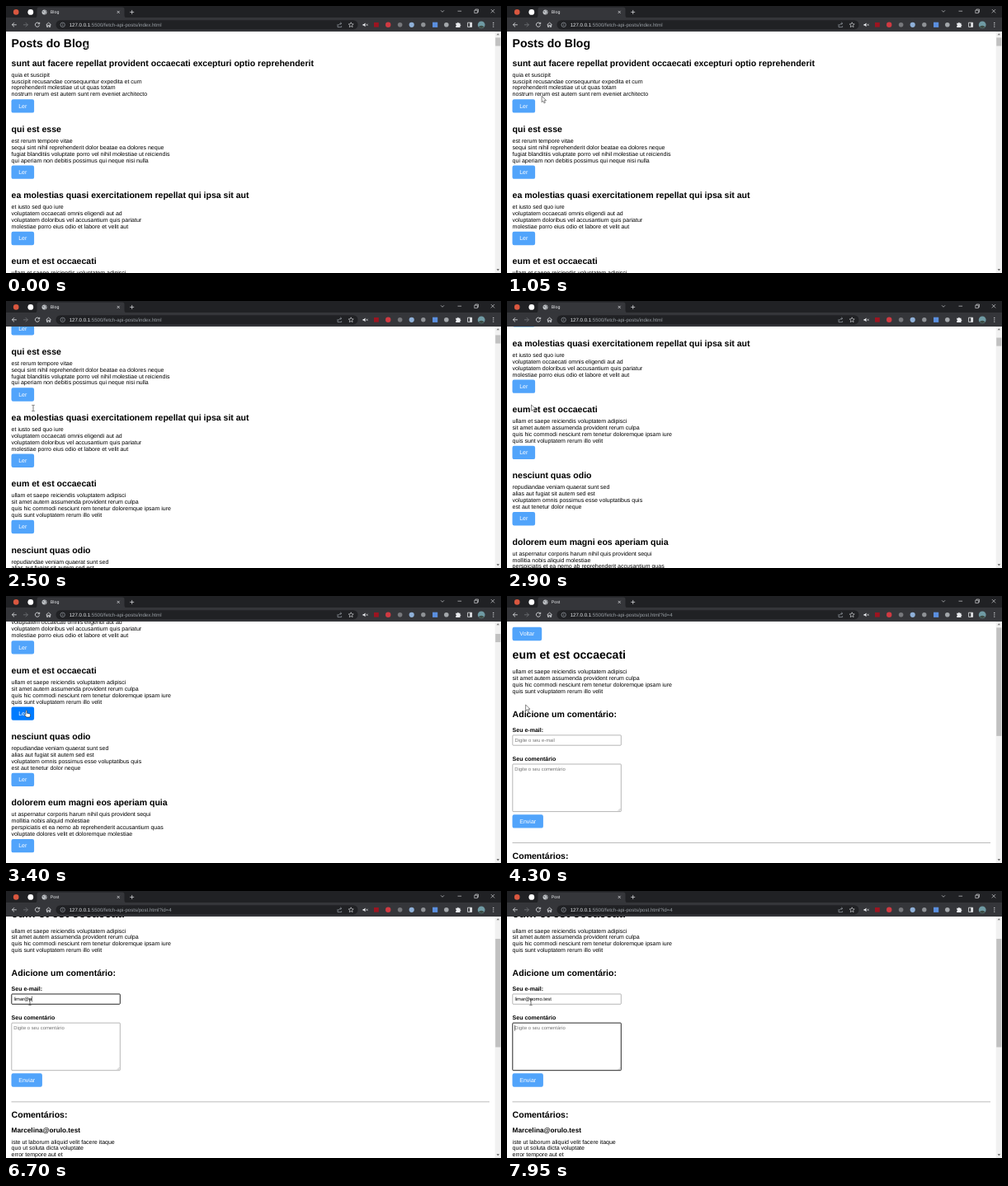
These frames come from a looping animation (600 by 324 pixels, 8000 ms). An HTML page:

```html
<!DOCTYPE html>
<html lang="pt">
<head>
<meta charset="utf-8">
<title>Blog</title>
<style>
  html, body { margin: 0; height: 100%; overflow: hidden; background: #fff; }
  svg { display: block; width: 100vw; height: 100vh; }
  text { font-family: "Liberation Sans", Arial, sans-serif; text-rendering: geometricPrecision; }
</style>
</head>
<body>
<svg id="stage" viewBox="0 0 600 324"></svg>
<script>
const LOOP = 8000, NAV = 4150, FOCUS = 5300, LEAVE = 7950;
const TOP = 69, PITCH = 80.27, LINE = 7.906;
const BLUE = '#51a4fb', HOVER = '#007bff';

const posts = [
  ['sunt aut facere repellat provident occaecati excepturi optio reprehenderit',
    'quia et suscipit', 'suscipit recusandae consequuntur expedita et cum',
    'reprehenderit molestiae ut ut quas totam', 'nostrum rerum est autem sunt rem eveniet architecto'],
  ['qui est esse',
    'est rerum tempore vitae', 'sequi sint nihil reprehenderit dolor beatae ea dolores neque',
    'fugiat blanditiis voluptate porro vel nihil molestiae ut reiciendis', 'qui aperiam non debitis possimus qui neque nisi nulla'],
  ['ea molestias quasi exercitationem repellat qui ipsa sit aut',
    'et iusto sed quo iure', 'voluptatem occaecati omnis eligendi aut ad',
    'voluptatem doloribus vel accusantium quis pariatur', 'molestiae porro eius odio et labore et velit aut'],
  ['eum et est occaecati',
    'ullam et saepe reiciendis voluptatem adipisci', 'sit amet autem assumenda provident rerum culpa',
    'quis hic commodi nesciunt rem tenetur doloremque ipsam iure', 'quis sunt voluptatem rerum illo velit'],
  ['nesciunt quas odio',
    'repudiandae veniam quaerat sunt sed', 'alias aut fugiat sit autem sed est',
    'voluptatem omnis possimus esse voluptatibus quis', 'est aut tenetur dolor neque'],
  ['dolorem eum magni eos aperiam quia',
    'ut aspernatur corporis harum nihil quis provident sequi', 'mollitia nobis aliquid molestiae',
    'perspiciatis et ea nemo ab reprehenderit accusantium quas', 'voluptate dolores velit et doloremque molestiae']
];

// Text placed by the middle of its line box
const text = (x, mid, size, str, attrs = '') =>
  `<text x="${x}" y="${(mid + size * 0.346).toFixed(2)}" font-size="${size}" ${attrs}>${str}</text>`;
const bold = (mid, size, str) => text(6.6, mid, size, str, 'font-weight="700"');
const lines = (mid, list) => list.map((s, i) => text(6.6, mid + i * LINE, 7.03, s)).join('');
const rect = (x, y, w, h, fill, attrs = '') =>
  `<rect x="${x}" y="${y}" width="${w}" height="${h}" fill="${fill}" ${attrs}/>`;
const dot = (x, y, r, fill) => `<circle cx="${x}" cy="${y}" r="${r}" fill="${fill}"/>`;
const path = (d, stroke, width = 0.8, fill = 'none') =>
  `<path d="${d}" stroke="${stroke}" stroke-width="${width}" fill="${fill}"/>`;
const button = (y, w, label, cls = '') =>
  rect(6.5, y, w, 16.4, BLUE, `rx="2.2" class="${cls}"`) +
  text(6.5 + w / 2, y + 8.1, 7.03, label, 'fill="#fff" text-anchor="middle"');
const field = (id, y, h) => rect(6.8, y, 131.5, h, '#fff', `id="${id}" rx="0.8"`);

const indexPage = () => bold(45.4, 14.05, 'Posts do Blog') + posts.map(([title, ...body], i) => {
  const y = TOP + i * PITCH;
  return bold(y, 10.54, title) + lines(y + 14.2, body) + button(y + 44.2, 27.6, 'Ler', 'ler');
}).join('');

const postPage = () =>
  button(37.8, 35.7, 'Voltar') + bold(71.3, 14.05, posts[3][0]) + lines(92, posts[3].slice(1)) +
  bold(143.2, 10.54, 'Adicione um comentário:') +
  bold(162.1, 7.03, 'Seu e-mail:') + field('mail', 168.9, 12.3) +
  text(9.4, 175, 5.86, '', 'id="mailText"') +
  bold(197.3, 7.03, 'Seu comentário') + field('note', 204, 57.6) +
  text(9.2, 209.9, 5.86, 'Digite o seu comentário', 'fill="#757575"') +
  path('M134.8 260.7l2.6-2.6M136.4 260.7l1-1', '#666', 0.4) +
  rect(9.4, 0, 0.5, 7, '#000', 'id="caret"') +
  button(265.2, 37.4, 'Enviar') + rect(6.5, 299.3, 579.5, 0.8, '#a5a5a5') +
  bold(315.1, 10.54, 'Comentários:') + bold(334.5, 8.22, 'Marcelina@orulo.test') +
  lines(348, ['iste ut laborum aliquid velit facere itaque', 'quo ut soluta dicta voluptate', 'error tempore aut et']);

const scrollbar = () =>
  rect(592.7, 30.5, 7.3, 293.5, '#f1f1f1') + rect(593.2, 38.4, 6.2, 10, '#c1c1c1', 'id="thumb"') +
  path('M594.6 35.2h3.4l-1.7-1.9z', 'none', 0, '#777') + path('M594.6 319.3h3.4l-1.7 1.9z', 'none', 0, '#505050');

const browser = () => {
  const pale = '#e8eaed', grey = '#9aa0a6';
  return rect(0, 0, 600, 16, '#202124') + rect(0, 14, 600, 17, '#35363a') +
    path('M35 14.5Q37.5 14 37.5 11V4Q37.5 1.5 40 1.5H141Q143.5 1.5 143.5 4V11Q143.5 14 146 14.5z', 'none', 0, '#35363a') +
    dot(12.2, 7.4, 3.3, '#d9573f') + dot(29.8, 7.4, 3.4, '#fff') +
    dot(46.5, 7.4, 3, '#c4c7cb') + path('M44 6l2 .8-.6 1.6M47 4.8l1 1.6 1.4.4M47.4 10l.4-1.8 1-.3', '#5f6368', 0.7) +
    text(53.8, 7.4, 5.27, '', `id="tab" fill="${pale}"`) +
    path('M134.7 5.9l3 3m0-3l-3 3M150.2 7.4h5m-2.5-2.5v5', pale, 0.7) +
    path('M527 5.3l2 2 2-2M547.5 6.2h4.6M587.8 4l4.4 4.4m0-4.4l-4.4 4.4M567.8 5.2h3.6v3.4h-3.6zM568.9 5v-1h3.6v3.4h-1', pale, 0.6) +
    path('M12.8 22.8H7.4m2.6-2.6l-2.6 2.6 2.6 2.6', pale) +
    path('M21 22.8h5.4m-2.6-2.6l2.6 2.6-2.6 2.6', '#75787c') +
    path('M40 21a2.6 2.6 0 1 0 .5 2.4M40.7 19.8v2h-2', pale) +
    path('M48.6 22.8l3-2.6 3 2.6M49.6 22.4v3h1.2v-2h1.6v2h1.2v-3', pale) +
    rect(60.5, 17.2, 366, 11.2, '#202124', 'rx="5.6"') +
    path('M66 22.8a2.7 2.7 0 1 0 5.4 0a2.7 2.7 0 1 0-5.4 0M68.7 22.4v1.8M68.7 21v.7', grey, 0.7) +
    `<text x="76.7" y="24.9" font-size="6.1" fill="${grey}"><tspan fill="${pale}">127.0.0.1</tspan>:5500/fetch-api-posts/<tspan id="file"></tspan></text>` +
    path('M402 22v3.6h4.6v-1.4M403 23.6q.6-2.4 3.4-2.4m-1.2-1.4l1.6 1.4-1.6 1.4', grey, 0.7) +
    path('M418.2 19.8l.9 2 2.1.2-1.6 1.5.5 2.1-1.9-1.1-1.9 1.1.5-2.1-1.6-1.5 2.1-.2z', pale, 0.6) +
    path('M432.5 22h1.3l1.7-1.5v4.8l-1.7-1.5h-1.3z', 'none', 0, pale) + path('M436.6 21.7l2 2.2m0-2.2l-2 2.2', pale, 0.6) +
    rect(446, 20, 5.8, 5.6, '#9c1420') + dot(463.2, 22.8, 3.2, '#d03a42') +
    dot(477.6, 22.8, 2.8, '#77787c') + dot(491.7, 22.8, 3.1, '#8fb0d8') + dot(505.8, 22.8, 2.7, '#8f9296') +
    rect(517, 19.7, 6.2, 6.2, '#5b8fdf') + dot(533.8, 22.8, 2.8, '#a3a7ab') +
    path('M545.2 20.8h1.8q.9-2 1.8 0h1.7v1.8q2 .8 0 1.7v1.6h-5.3v-1.6q1.8-.9 0-1.7z', 'none', 0, pale) +
    path('M559.6 20.2h5v5.2h-5z', pale, 0.8) + rect(562.3, 20.2, 2.3, 5.2, pale) +
    dot(576.2, 22.8, 4.4, '#6f9aa3') + path('M572.6 25.2q3.5-3 7 0a4.4 4.4 0 0 1-7 0z', 'none', 0, '#3d4a42') +
    [20.5, 22.8, 25.1].map(y => dot(590.8, y, 0.65, pale)).join('');
};

const shapes = {
  arrow: path('M0 0V7.3l1.7-1.5 1.1 2.7 1.4-.6-1.1-2.6h2.3z', '#111', 0.5, '#fff'),
  hand: path('M-.6 .5q.7-.9 1.4 0V3.6l3.4.8q.9.3.8 1.4l-.6 2.7H.1L-2.3 5.4q.3-1.2 1.7 0z', '#111', 0.5, '#fff'),
  beam: path('M-1.7-3.6h1.3l.4.4.4-.4h1.3M0-3.2V3.2M-1.7 3.6h1.3l.4-.4.4.4h1.3', '#222', 0.6)
};

// The minute skew keeps text baselines from snapping to whole pixels
const $ = id => document.getElementById(id);
$('stage').innerHTML = rect(0, 0, 600, 324, '#fff') +
  `<g transform="matrix(1 .00001 0 1 0 0)"><g id="index">${indexPage()}</g><g id="post">${postPage()}</g></g>` +
  scrollbar() + browser() + '<g id="cursor"></g>';
const readers = [...document.querySelectorAll('.ler')];

// Eased value between keys of the form [time, value, ...]
function track(keys, t, col = 1) {
  const i = keys.findIndex(k => k[0] > t);
  if (i < 0) return keys[keys.length - 1][col];
  if (!i) return keys[0][col];
  const a = keys[i - 1], b = keys[i], p = (t - a[0]) / (b[0] - a[0]);
  return a[col] + (b[col] - a[col]) * p * p * (3 - 2 * p);
}

const moves = [[0, 95, 43.5], [250, 95, 43.5], [1250, 36, 117], [1750, 31.5, 125], [2250, 31.5, 125],
  [2450, 33, 130], [2600, 33, 130], [2850, 29.5, 126], [3000, 29.5, 126], [3500, 24, 140],
  [4050, 24, 140], [4300, 22.6, 132], [4750, 22.6, 132], [5200, 29, 135]];
const indexScroll = [[2280, 0], [2480, 88.2], [2630, 88.2], [2880, 178.3], [2920, 178.3], [3080, 219.6]];
const postScroll = [[4750, 0], [4950, 43.9]];
const address = 'limar@pomo.test';
const keyTimes = [5750, 5800, 5950, 6050, 6250, 6450, 6700, 6800, 6900, 7000, 7150, 7350, 7500, 7600, 7700];

function outline(id, focused) {
  $(id).setAttribute('stroke', focused ? '#101010' : '#858585');
  $(id).setAttribute('stroke-width', focused ? 0.9 : 0.6);
}

function render(t) {
  const onPost = t >= NAV;
  const scroll = onPost ? track(postScroll, t) : track(indexScroll, t);
  const x = track(moves, t, 1), y = track(moves, t, 2);
  const page = $(onPost ? 'post' : 'index');
  $('index').style.display = onPost ? 'none' : '';
  $('post').style.display = onPost ? '' : 'none';
  page.setAttribute('transform', `translate(0 ${-scroll})`);
  $('tab').textContent = onPost ? 'Post' : 'Blog';
  $('file').textContent = onPost ? 'post.html?id=4' : 'index.html';

  const total = onPost ? 622 : 8100, room = 279;
  $('thumb').setAttribute('y', 38.4 + scroll / total * room);
  $('thumb').setAttribute('height', 293 / total * room);

  let over = false;
  readers.forEach((b, i) => {
    const top = TOP + i * PITCH + 44.2 - scroll;
    const hit = !onPost && x > 6.5 && x < 34.1 && y > top && y < top + 16.4;
    b.setAttribute('fill', hit ? HOVER : BLUE);
    over = over || hit;
  });
  const beam = (t >= 2400 && t < 2650) || t >= 5150;
  $('cursor').innerHTML = shapes[over ? 'hand' : beam ? 'beam' : 'arrow'];
  $('cursor').setAttribute('transform', `translate(${x} ${y})`);

  if (!onPost) return;
  const typed = address.slice(0, keyTimes.filter(k => k <= t).length);
  const left = t >= LEAVE, focused = t >= FOCUS;
  const label = $('mailText'), caret = $('caret');
  label.textContent = typed || 'Digite o seu e-mail';
  label.setAttribute('fill', typed ? '#000' : '#757575');
  outline('mail', focused && !left);
  outline('note', left);
  caret.style.display = focused ? '' : 'none';
  caret.setAttribute('x', typed && !left ? 9.4 + label.getComputedTextLength() : 9.2);
  caret.setAttribute('y', left ? 206.6 : 171.5);
}

const start = performance.now();
function tick() {
  const t = (performance.now() - start) % LOOP;
  render(Math.floor(t / 50) * 50);
  requestAnimationFrame(tick);
}
tick();
</script>
</body>
</html>
```
